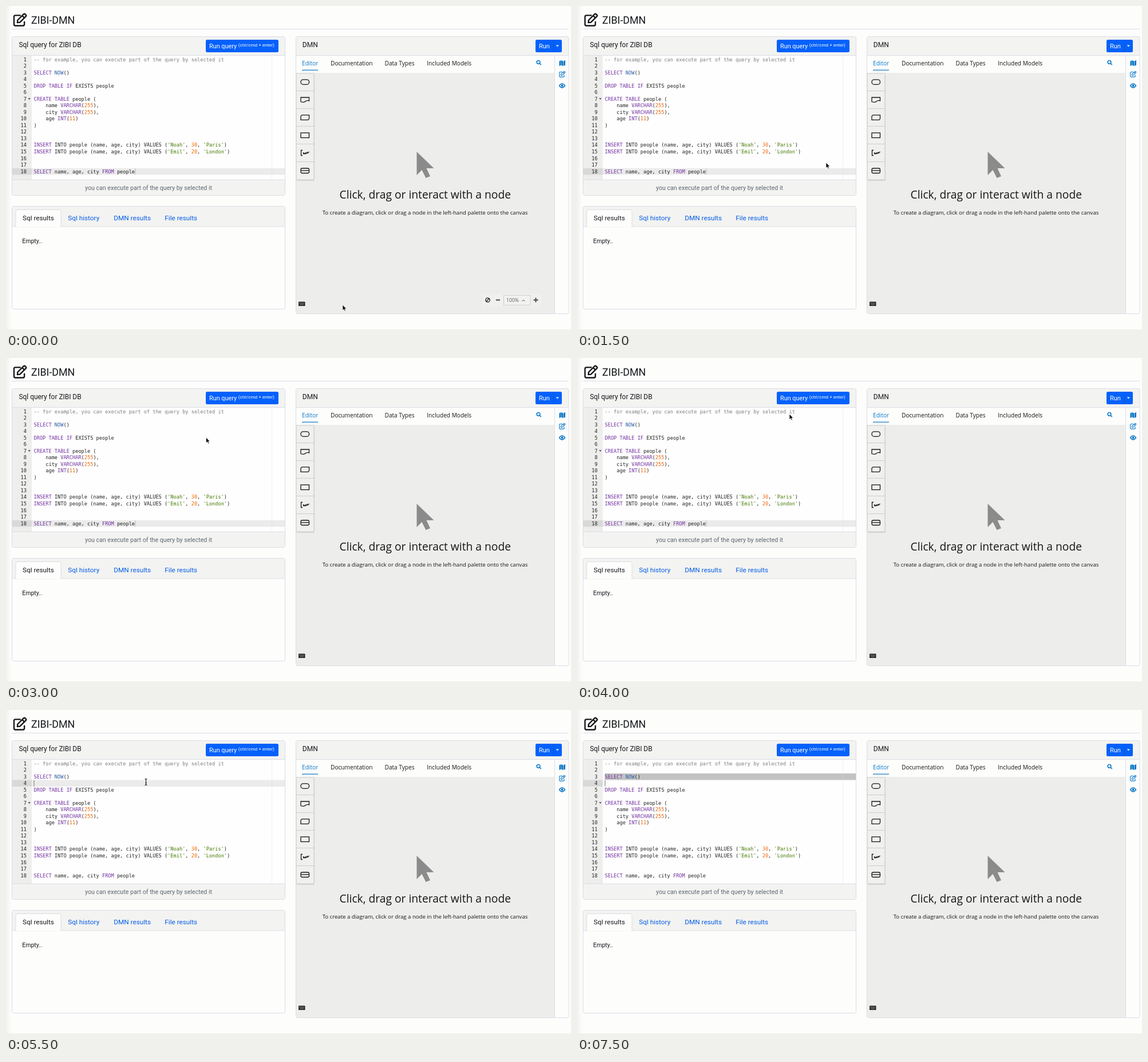
Write an HTML page that moves like this. It is 987 px wide and 567 px high and loops after 8 s.

```html
<!DOCTYPE html>
<html lang="en">
<head>
<meta charset="utf-8">
<title>SQL and DMN workspace</title>
<style>
html, body { margin: 0; width: 100%; height: 100%; overflow: hidden; background: #fdfdfc; }
svg { display: block; width: 987px; height: 567px; }
text { white-space: pre; font-family: Roboto, Arial, sans-serif; fill: #16181b; }
.open { font-family: "Open Sans", sans-serif; fill: #161616; }
.code { font: 8.64px "DejaVu Sans Mono", monospace; fill: #222; }
.kw { fill: #7232a0; }
.fn { fill: #2c5ea4; }
.num { fill: #ec6608; }
.str { fill: #447a00; }
.com { fill: #7c7e80; }
.line { fill: none; stroke: #dcdce8; }
.icon { fill: none; stroke: #161616; stroke-width: 1.3; }
.blue { stroke: #0a78c8; }
</style>
</head>
<body>
<svg id="stage" viewBox="0 0 987 567"></svg>
<script>
const ROW = 11.53, CHAR = 5.2, TOP = 87.9, LEFT = 48.5, TICK = 500, LOOP = 8000;
const SOURCE = `-- for example, you can execute part of the query by selected it

SELECT NOW()

DROP TABLE IF EXISTS people

CREATE TABLE people (
    name VARCHAR(255),
    city VARCHAR(255),
    age INT(11)
)


INSERT INTO people (name, age, city) VALUES ('Noah', 30, 'Paris')
INSERT INTO people (name, age, city) VALUES ('Emil', 20, 'London')


SELECT name, age, city FROM people`.split('\n');

const rect = (x, y, w, h, fill, rest = '') =>
  `<rect x="${x}" y="${y}" width="${w}" height="${h}" fill="${fill}" ${rest}/>`;
const path = (d, cls = 'icon', rest = '') => `<path d="${d}" class="${cls}" ${rest}/>`;
const text = (x, y, size, s, rest = '') =>
  `<text x="${x}" y="${y}" font-size="${size}" ${rest}>${s}</text>`;
const open = (x, y, size, s, rest = '') => text(x, y, size, s, `class="open" ${rest}`);
const group = (id, body) => `<g id="${id}">${body}</g>`;
const rowY = n => TOP + ROW * (n - 1);

const TOKEN = /(--.*)|('[^']*')|\b(SELECT|DROP|TABLE|IF|CREATE|VARCHAR|INT|INSERT|FROM)\b|\b(NOW)\b|\b(\d+)\b/g;
const KINDS = ['com', 'str', 'kw', 'fn', 'num'];
const paint = s => s.replace(TOKEN, (all, ...parts) =>
  `<tspan class="${KINDS[parts.slice(0, 5).findIndex(Boolean)]}">${all}</tspan>`);

const codeLines = SOURCE.map((s, i) => {
  const y = rowY(i + 1) + 8.7;
  return `<text class="code" x="36" y="${y}" text-anchor="end">${i + 1}</text>` +
    `<text class="code" x="${LEFT}" y="${y}">${paint(s)}</text>`;
}).join('');

// Square outline with a pencil, drawn in a 24 by 24 box
const pencil = (x, y, scale, color) => `<g transform="translate(${x} ${y}) scale(${scale})"
  fill="none" stroke="${color}" stroke-width="2.400" stroke-linejoin="round">
  <path d="M13.500 4.500H4Q1.500 4.500 1.500 7V20.500Q1.500 23 4 23H17.500Q20 23 20 20.500V15"/>
  <path d="M7.500 17.500L8 13L18.500 2.500Q20 1 21.500 2.500L22.500 3.500Q24 5 22.500 6.500L12 17ZM16 5L20 9"/></g>`;

const header =
  `<linearGradient id="edge"><stop stop-color="#f1f1ee"/><stop offset="1" stop-color="#fdfdfc"/></linearGradient>` +
  rect(0, 0, 9, 567, 'url(#edge)') +
  pencil(12.5, 12, .98, '#141618') +
  text(44, 30.5, 17.8, 'ZIBI-DMN') +
  path('M10 40.5H983', 'line') + rect(0, 566, 987, 1, '#efefe6');

const queryPanel =
  rect(10.5, 53.5, 477, 278, '#fefefe', 'rx="3"') +
  rect(11, 54, 476, 33, '#f3f3f1') +
  rect(11, 304, 476, 27, '#f3f3f1') +
  rect(11, 87, 34, 217, '#eeeeec') +
  group('marks', '') +
  path('M464.500 87V304', 'line', 'opacity=".4"') +
  codeLines +
  path('M38.500 161.200h4.400l-2.200 2.700z', '', 'fill="#444"') +
  group('caret', '') +
  path('M11 86.500H488M11 304H488', 'line') +
  rect(10.5, 53.5, 477, 278, 'none', 'class="line" rx="3"') +
  text(22.5, 71.7, 11.9, 'Sql query for ZIBI DB') +
  rect(349, 59, 127, 22, '#0561fb', 'rx="2.500"') +
  text(355, 74, 10.84, 'Run query', 'style="fill:#fff"') +
  text(405.8, 70.6, 8.04, '(ctrl/cmd + enter)', 'style="fill:#fff"') +
  text(249, 321.7, 10.65, 'you can execute part of the query by selected it',
    'text-anchor="middle" style="fill:#5f676e"');

const tabs = [[108.3, 'Sql history'], [188.3, 'DMN results'], [277.3, 'File results']];
const resultPanel =
  rect(10.5, 350.5, 477, 180, '#fdfdfc', 'rx="3"') +
  rect(11, 351, 476, 35, '#f3f3f1') +
  path('M11 386H488', 'line') +
  rect(10.5, 350.5, 477, 180, 'none', 'class="line" rx="3"') +
  path('M17 386.500V359.500Q17 356.500 20 356.500H93Q96 356.500 96 359.500V386.500', '', 'fill="#fdfdfc" stroke="#dcdce8"') +
  text(29, 375.3, 11.75, 'Sql results') +
  tabs.map(([x, s]) => text(x, 375.3, 11.75, s, 'style="fill:#055ce8"')).join('') +
  text(28.3, 414.7, 10.5, 'Empty..');

const shapes =
  rect(515, 128.8, 14.5, 8.5, 'none', 'class="icon" rx="4"') +
  path('M515 160H529.500V166Q526 164.500 523 167T515 167.500Z') +
  path('M517 190.800H529.500V197.300L527.800 199.300H515V192.800Z') +
  rect(515, 222, 14.5, 8.5, 'none', 'class="icon"') +
  path('M518 252.500H515.500V261.500H518M519.500 256v2.500q1.500 1 2-1.500q0 3 2 1v-2q1 4 2.500 1v-1.500q1 3 2 1l1.500-1.500') +
  rect(515, 284, 14.5, 8.5, 'none', 'class="icon" rx="2.500"') + path('M515 288H529.500');

const palette =
  rect(508, 119, 31, 187, '#000', 'opacity=".1" rx="2"') +
  rect(507, 118, 31, 186, '#f0f0ee', 'stroke="#cdcdd2"') +
  path([1, 2, 3, 4, 5].map(i => `M507 ${117.5 + 31 * i}H538`).join(''), '', 'stroke="#cdcdd2"') + shapes;

const zoom =
  rect(832, 504, 103, 22, '#f0f0ee') +
  '<circle cx="841.500" cy="514.500" r="3.700" class="icon"/>' +
  path('M839 517L844 512') +
  path('M856 514.500H863M921.500 514.500H929.500M925.500 510.500V518.500', '', 'stroke="#444" stroke-width="1.800"') +
  rect(869.5, 506.5, 46.5, 17, '#f2f2f0', 'stroke="#cfcfd2"') +
  open(874, 518, 8.6, '100%', 'style="fill:#666"') +
  path('M901.500 516.500L904 514.500L906.500 516.500', '', 'fill="none" stroke="#555"');

const dmnTabs = [[567, 'Documentation'], [661.5, 'Data Types'], [735.3, 'Included Models']];
const dmnPanel =
  rect(506.5, 53.5, 476.5, 485, '#fdfdfc', 'rx="3"') +
  rect(507, 54, 476, 33, '#f3f3f1') +
  rect(507, 117, 451, 421, '#ededeb') +
  path('M507 86.500H983M958.500 87V538', 'line') +
  rect(506.5, 53.5, 476.5, 485, 'none', 'class="line" rx="3"') +
  text(517.8, 71.7, 12, 'DMN') +
  rect(925, 59, 46, 22, '#0561fb', 'rx="2.500"') +
  path('M956.500 59V81', '', 'stroke="#0a57d5"') +
  text(931, 74, 11, 'Run', 'style="fill:#fff"') +
  path('M960.800 68.500h5l-2.500 3z', '', 'fill="#fff"') +
  open(517, 104, 10.15, 'Editor', 'style="fill:#0a78c8"') +
  rect(517, 111.5, 28, 1.5, '#3a8fcf') +
  dmnTabs.map(([x, s]) => open(x, 104, 10.15, s)).join('') +
  '<circle cx="930" cy="98.300" r="2.900" class="icon blue" style="stroke-width:1.500"/>' +
  path('M932.200 100.500L934.800 103', 'icon blue', 'style="stroke-width:1.700"') +
  path('M966.500 96.500L969.500 95V103.500L966.500 105ZM970 95L973 96.500V105L970 103.500ZM973.700 96.500L977 95V103.500L973.700 105Z', '', 'fill="#0a78c8"') +
  pencil(966, 113.5, .46, '#0a78c8') +
  path('M966.500 139.500Q971.500 132.500 976.500 139.500Q971.500 146.500 966.500 139.500Z', 'icon blue') +
  '<circle cx="971.500" cy="139.500" r="2" fill="#0a78c8"/>' +
  palette +
  path('M717.500 255V296L726.500 287L733.500 301L741 298L734.500 284H747.500Z', '', 'fill="#8b8b8b"') +
  open(732.3, 336.7, 19.25, 'Click, drag or interact with a node', 'text-anchor="middle"') +
  open(732, 364.5, 9.62, 'To create a diagram, click or drag a node in the left-hand palette onto the canvas',
    'text-anchor="middle"') +
  rect(511, 517.5, 11.5, 7.5, '#222', 'rx="1"') +
  path('M512.500 519.700H521.500M512.500 521.500H521.500M514 523.400H520', '', 'stroke="#ddd" stroke-width=".8" stroke-dasharray="1 .8"') +
  group('zoom', zoom);

const pointers =
  group('arrow', path('M0 0V9.500L2.200 7.600L3.700 11L5.300 10.300L3.800 7H6.700Z', '', 'fill="#000" stroke="#fff" stroke-width=".7"')) +
  group('beam', path('M-2-5.500Q0-5.500 0-4Q0-5.500 2-5.500M0-4.500V4.500M-2 5.500Q0 5.500 0 4Q0 5.500 2 5.500M-1.200 1.500H1.200', '', 'fill="none" stroke="#111" stroke-width="1.100"'));

const stage = document.getElementById('stage');
stage.innerHTML = rect(0, 0, 987, 567, '#fdfdfc') + header + queryPanel + resultPanel + dmnPanel + pointers;
const $ = id => document.getElementById(id);
const show = (id, on) => $(id).setAttribute('visibility', on ? 'visible' : 'hidden');

// Pointer stops: tick, x, y
const stops = [[0, 588, 523], [1, 560, 478], [3, 435, 274], [6, 349.5, 139], [8, 371, 98],
  [11, 244.5, 126], [13, 242, 119], [16, 242, 119]];

function pointerAt(tick) {
  const i = stops.findIndex(s => s[0] > tick) - 1;
  const [t0, x0, y0] = stops[i], [t1, x1, y1] = stops[i + 1], k = (tick - t0) / (t1 - t0);
  return [x0 + (x1 - x0) * k, y0 + (y1 - y0) * k];
}

function drawSelection(tick) {
  const selected = tick === 15;
  const row = tick < 11 ? 18 : tick < 13 || selected ? 4 : 3;
  const y = rowY(row), x = LEFT + CHAR * SOURCE[row - 1].length;
  let marks = rect(11, y, 34, ROW, '#d9d9d9');
  marks += selected ? rect(LEFT, rowY(3), 439, ROW, '#c2c2c2') : rect(45, y, 442, ROW, '#ebebeb');
  if (row === 3) {
    marks += [10, 11].map(c =>
      rect(LEFT + CHAR * c, y + .5, CHAR, ROW - 1, 'none', 'stroke="#bbb" stroke-width=".8"')).join('');
  }
  $('marks').innerHTML = marks;
  $('caret').innerHTML = rect(x, y + .3, 1, ROW - .6, tick < 11 ? '#bbb' : '#777');
}

let last = -1;
function frame(now) {
  const tick = Math.floor(now % LOOP / TICK);
  if (tick !== last) {
    last = tick;
    const at = `translate(${pointerAt(tick)})`;
    $('arrow').setAttribute('transform', at);
    $('beam').setAttribute('transform', at);
    show('arrow', tick < 10);
    show('beam', tick >= 10 && tick < 15);
    show('zoom', tick < 2);
    drawSelection(tick);
  }
  requestAnimationFrame(frame);
}
frame(0);
</script>
</body>
</html>
```
